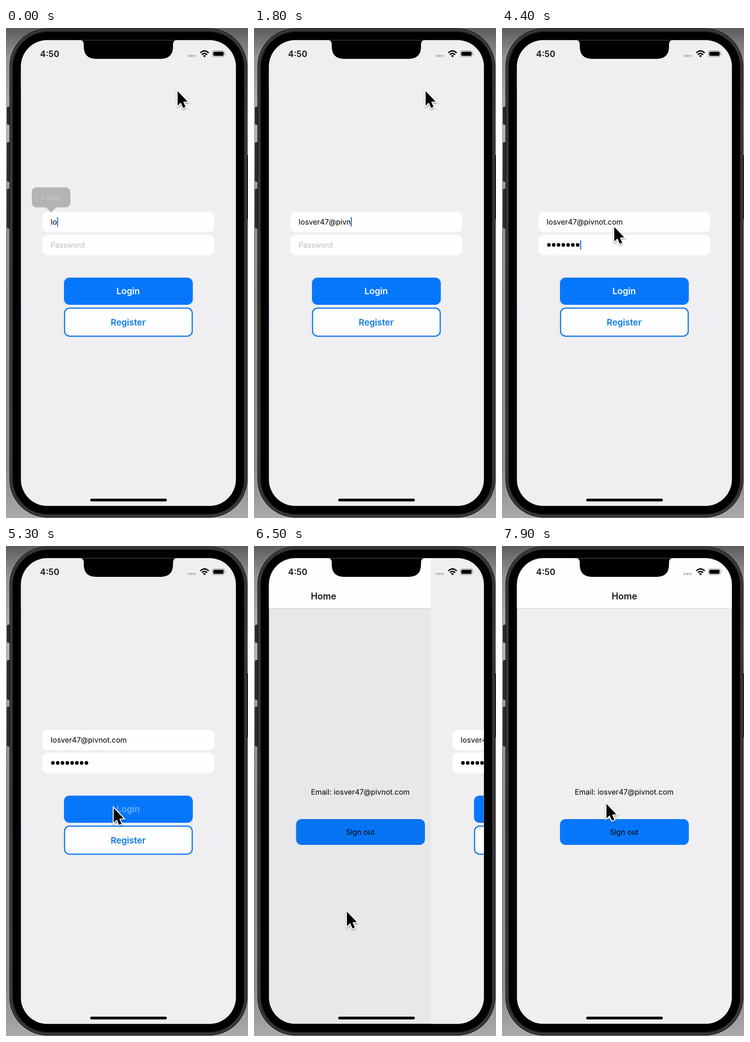
Recreate the animation shown at these times as an HTML page. Size 526 by 1064 pixels, loop 8 s.

```html
<!DOCTYPE html>
<html lang="en">
<head>
<meta charset="utf-8">
<title>Login flow</title>
<style>
  html, body { margin: 0; width: 100%; height: 100%; overflow: hidden; background: #8c8b8d; }
  svg { display: block; width: 526px; height: 1064px; font: 16px Inter, sans-serif; }
  .mid { text-anchor: middle; }
  .bold { font-weight: 600; font-size: 19px; }
  .field { fill: #fefdff; }
  .blue { fill: #0677fb; }
  .hint { fill: #bdbcc0; }
</style>
</head>
<body>
<svg viewBox="0 0 526 1064">
  <defs>
    <linearGradient id="wall" x2="0" y2="1">
      <stop offset="0" stop-color="#5c5b5d"/>
      <stop offset=".06" stop-color="#939294"/>
      <stop offset=".2" stop-color="#b5b4b6"/>
      <stop offset=".4" stop-color="#8f8e90"/>
      <stop offset=".9" stop-color="#8a898b"/>
      <stop offset="1" stop-color="#aaa9ab"/>
    </linearGradient>
    <clipPath id="screen"><rect x="32.5" y="26.5" width="467" height="1011" rx="57"/></clipPath>
    <filter id="shade" x="-50%" y="-50%" width="200%" height="200%">
      <feDropShadow dx="0" dy="2" stdDeviation="1.6" flood-opacity=".4"/>
    </filter>
  </defs>

  <!-- phone body -->
  <rect width="526" height="1064" fill="url(#wall)"/>
  <g fill="#2a2a2c" stroke="#171718">
    <rect x="2.5" y="171.500" width="8" height="38" rx="2"/>
    <rect x="2.5" y="248.500" width="8" height="85" rx="2"/>
    <rect x="2.5" y="349.500" width="8" height="85" rx="2"/>
    <rect x="521" y="277" width="8" height="138" rx="2"/>
  </g>
  <rect x="8.500" y="2" width="515" height="1060" rx="82" fill="#414143" stroke="#202022" stroke-width="2"/>
  <rect x="12" y="5.500" width="508" height="1053" rx="79" fill="#2b2b2d"/>
  <rect x="15" y="8.500" width="502" height="1047" rx="76"/>

  <g clip-path="url(#screen)">
    <rect x="32" y="26" width="468" height="1012" fill="#efeef0"/>
    <g id="home">
      <text class="mid" x="265.500" y="540" id="mail"></text>
      <rect class="blue" x="126" y="593" width="280" height="56" rx="12"/>
      <text class="mid" x="265.500" y="627">Sign out</text>
    </g>
    <rect id="dim" x="32" y="26" width="468" height="1012"/>
    <g id="nav">
      <rect class="field" x="32" y="26" width="467.500" height="109"/>
      <path d="M32 135.500H499.500" stroke="#c9c8cb"/>
      <text class="mid bold" x="266" y="116" style="font-size:19.500px" fill="#18171a">Home</text>
    </g>

    <g id="login">
      <rect x="32.500" y="26" width="468" height="1012" fill="#efeef0"/>
      <rect class="field" x="79" y="399" width="374" height="44.500" rx="12"/>
      <rect class="field" x="79" y="449" width="374" height="44.500" rx="12"/>
      <text id="user" x="97" y="427"></text>
      <text id="hint" class="hint" x="97" y="477">Password</text>
      <path id="dots" stroke="#000" stroke-width="7.800" stroke-linecap="round" stroke-dasharray="0 10.400"/>
      <rect id="caret" width="2.300" height="20" fill="#3b6cd6"/>
      <rect class="blue" x="126" y="542" width="280" height="59" rx="12"/>
      <text id="label" class="mid bold" x="265.500" y="578" fill="#fff">Login</text>
      <rect x="127.200" y="608.200" width="277.600" height="61" rx="11" fill="#fefdff" stroke="#0b78ea" stroke-width="2.500"/>
      <text class="mid bold" x="265.500" y="645.500" fill="#0b78ea">Register</text>
      <g id="paste">
        <path d="M86 388.500H110L98 400.500Z" fill="#b4b3b5"/>
        <rect x="56" y="346" width="84" height="43.500" rx="10" fill="#b4b3b5"/>
        <text class="mid" x="98" y="374" fill="#c8c7c9">Paste</text>
      </g>
    </g>

    <!-- status bar and notch -->
    <path d="M160 20V26Q169 26 169 36V40Q169 67 196 67H336Q363 67 363 40V36Q363 26 372 26V20Z"/>
    <text class="bold mid" x="95" y="63" style="font-size:18.500px" fill="#111">4:50</text>
    <path d="M397 60.500H415" stroke="#b9b8bb" stroke-width="4.300" stroke-dasharray="4.300 1.200" transform="translate(-2)"/>
    <g fill="none" stroke="#000" stroke-width="3">
      <path d="M422.500 54Q431.500 45.500 440.500 54M425.800 57.800Q431.500 52.600 437.200 57.800"/>
      <path d="M428.300 60.300Q431.500 57.600 434.700 60.300L431.500 63.500Z" fill="#000" stroke="none"/>
    </g>
    <rect x="448.500" y="49.500" width="26.500" height="13" rx="4" fill="none" stroke="#8b8a8d"/>
    <rect x="450.500" y="51.500" width="22.500" height="9" rx="2.300"/>
    <path d="M476.500 53.500Q479 56 476.500 58.500Z" fill="#8b8a8d"/>
    <rect x="183" y="1022" width="166.500" height="6" rx="3"/>
  </g>

  <path id="cursor" d="M2 4V35.500L9 29L14 40.500L19.200 38.200L14.300 27.200L23.500 26.500Z"
        stroke="#fff" stroke-width="4" paint-order="stroke" filter="url(#shade)"/>
</svg>
<script>
const LOOP = 8000, STEP = 100, WIDTH = 467;
const PITCH = 10.4;
const user = "Iosver47@pivnot.com";
const userKeys = [100, 400, 500, 600, 800, 1000, 1200, 1400, 1500, 1600, 1800, 1900, 2000, 2200, 2300, 2400, 2500];
const passKeys = [3000, 3200, 3400, 3600, 3800, 3900, 4100, 4500];
// time, x, y
const path = [
  [3700, 371, 133], [4000, 320, 25], [4200, 270, 200], [4400, 242, 428],
  [4600, 238, 620], [4800, 228, 662], [4900, 228, 662], [5200, 232, 565],
  [5500, 232, 565], [5900, 200, 790], [6900, 200, 790], [7200, 149, 545],
  [7400, 270, 478], [7500, 380, 535], [7700, 300, 586], [7900, 225, 556]
];

const $ = id => document.getElementById(id);
const typed = (keys, t) => keys.filter(k => k <= t).length;
const move = (el, x, y = 0) => el.setAttribute("transform", `translate(${x} ${y})`);
const show = (el, alpha) => el.setAttribute("opacity", alpha);

function cursorAt(t) {
  const i = path.findIndex(p => p[0] > t);
  if (i < 1) return (i ? path.at(-1) : path[0]).slice(1);
  const [a, b] = [path[i - 1], path[i]];
  const k = (t - a[0]) / (b[0] - a[0]);
  return [1, 2].map(n => a[n] + (b[n] - a[n]) * k);
}

function slide(t) {
  if (t < 6400) return 0;
  const w = (t - 6350) * .0181;
  return t >= 7000 ? 1 : 1 - (1 + w) * Math.exp(-w);
}

function draw(t) {
  const name = $("user"), dots = typed(passKeys, t), inPass = t >= 2700;
  name.textContent = user.slice(0, 2 + typed(userKeys, t));
  show($("hint"), dots ? 0 : 1);
  $("dots").setAttribute("d", dots ? `M102 471h${PITCH * (dots - 1) + .1}` : "");
  const caretX = 97 + (inPass ? PITCH * dots : name.getComputedTextLength());
  move($("caret"), caretX, inPass ? 461 : 411);
  show($("caret"), t >= 5900 || (t >= 5100 && t < 5500) ? 0 : 1);
  show($("paste"), Math.max(0, 1 - t / 170));
  show($("label"), t >= 5300 && t < 5500 ? .4 : 1);

  const p = slide(t);
  move($("login"), WIDTH * p);
  move($("nav"), -WIDTH * (1 - p));
  move($("home"), -.3 * WIDTH * (1 - p));
  show($("dim"), .13 * (1 - p));
  move($("cursor"), ...cursorAt(t));
}

$("mail").textContent = "Email: " + user.toLowerCase();
const start = performance.now();
function tick() {
  const t = (performance.now() - start) % LOOP;
  draw(Math.floor(t / STEP) * STEP);
  requestAnimationFrame(tick);
}
tick();
</script>
</body>
</html>
```
